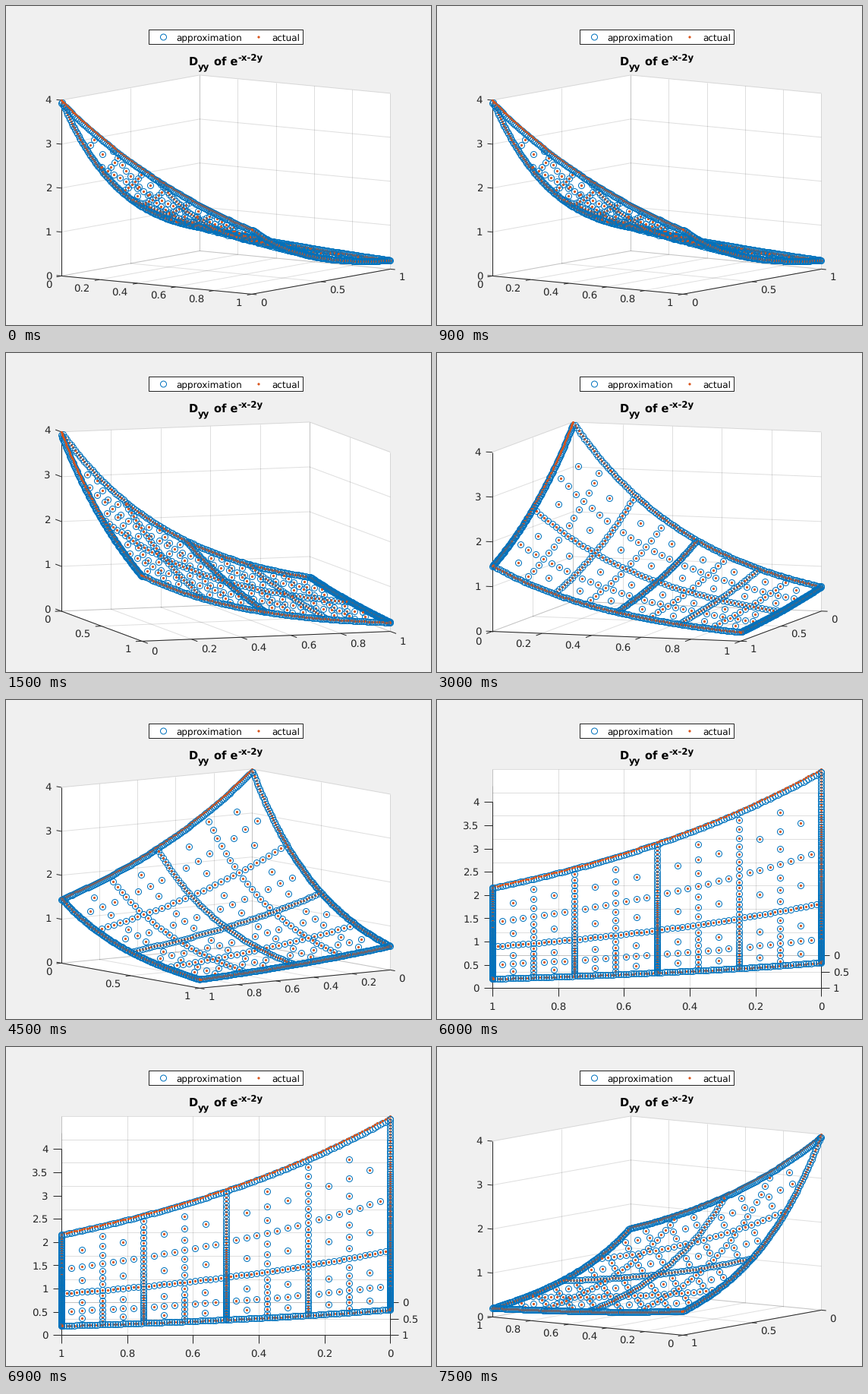
Write a matplotlib script that moves like this. It is 560 by 420 pixels and loops after 8 s.

```python
import numpy as np
import matplotlib.pyplot as plt
from matplotlib.animation import FuncAnimation
from matplotlib.collections import PathCollection
from matplotlib.patches import Polygon, Rectangle
from matplotlib.path import Path
from matplotlib.transforms import IdentityTransform

W, H, DPI = 560, 420, 100
PT = 72 / DPI                        # points per pixel
LEFT, RIGHT, TOP, BOTTOM = 72.8, 506.4, 91.0, 379.4
ELEV = np.radians(10)
LEVEL = 7
BLUE, ORANGE, INK = "#0072bd", "#d95319", "#262626"
RING, DOT = Path.circle((0, 0), 4), Path.circle((0, 0), 1.6)

plt.rcParams["font.family"] = "DejaVu Sans"
plt.rcParams["text.hinting"] = "none"
fig = plt.figure(figsize=(W / DPI, H / DPI), dpi=DPI, facecolor="#f0f0f0")
ax = fig.add_axes([0, 0, 1, 1])


def nodes(level):
    if level == 0:
        return [0.0, 1.0]
    return [k / 2**level for k in range(1, 2**level, 2)]


def sparse_grid(n):
    return np.array([(x, y) for a in range(n + 1) for b in range(n + 1 - a)
                     for x in nodes(a) for y in nodes(b)])


def surface(x, y):
    return 4 * np.exp(-x - 2 * y)


GX, GY = sparse_grid(LEVEL).T
STEP = 1 / 2**LEVEL
# the difference quotient is one-sided at the borders
APPROX = surface(GX, np.clip(GY, STEP, 1 - STEP))
ACTUAL = surface(GX, GY)


class View:
    """Orthographic view of the unit box, stretched to the plot area."""

    def __init__(self, azimuth):
        a = np.radians(azimuth + 1e-7)
        self.c, self.s = np.cos(a), np.sin(a)
        box = np.array([(x, y, z) for x in (0, 1) for y in (0, 1) for z in (0, 4)])
        u, v, _ = self.turn(*box.T)
        self.u0, self.v0 = u.min(), v.min()
        self.ku = (RIGHT - LEFT) / np.ptp(u)
        self.kv = (BOTTOM - TOP) / np.ptp(v)

    def turn(self, x, y, z):
        u = x * self.c + y * self.s
        d = y * self.c - x * self.s
        z = z / 4
        return (u, z * np.cos(ELEV) + d * np.sin(ELEV),
                d * np.cos(ELEV) - z * np.sin(ELEV))

    def depth(self, x, y, z):
        return np.round(self.turn(x, y, z)[2], 6)

    def px(self, x, y, z=0):
        u, v, _ = self.turn(x, y, z)
        return np.array([LEFT + (u - self.u0) * self.ku,
                         BOTTOM - (v - self.v0) * self.kv])


def label(x, y, text, size=13.33, ha="center", **kw):
    """Text whose digits are centred on y."""
    ax.text(x, y + 0.365 * size, text, fontsize=size * PT, ha=ha,
            va="baseline", **{"color": INK, **kw})


def lines(segments, color, alpha=1.0):
    for (x0, y0), (x1, y1) in segments:
        ax.plot([x0, x1], [y0, y1], color=color, alpha=alpha, lw=PT,
                solid_capstyle="butt")


def markers(points, rings, zorder):
    ax.add_collection(PathCollection(
        [RING if r else DOT for r in rings], offsets=points,
        offset_transform=ax.transData, transform=IdentityTransform(),
        facecolors=["none" if r else ORANGE for r in rings],
        edgecolors=[BLUE if r else "none" for r in rings],
        linewidths=[PT if r else 0 for r in rings],
        clip_on=False, zorder=zorder), autolim=False)


def ticks(step, end=1):
    return np.arange(round(end / step) + 1) * step


def unit(vec):
    return vec / np.hypot(*vec)


def draw_box(view):
    corners = [np.array(c, float) for c in ((0, 0), (1, 0), (0, 1), (1, 1))]
    left, *_, right = sorted(corners, key=lambda c: view.px(*c)[0])
    by_depth = sorted(corners, key=lambda c: view.turn(*c, 0)[2])
    front, back = by_depth[0], by_depth[-1]
    up = view.px(0, 0, 0)[1] - view.px(0, 0, 4)[1]
    zticks = ticks(0.5 if up > 240 else 1, 4)

    def edge_ticks(a, b):
        wide = np.hypot(*(view.px(*b) - view.px(*a))) > 200
        return ticks(0.2 if wide else 0.5)

    hull = [view.px(*left, 4), view.px(*back, 4), view.px(*right, 4),
            view.px(*right), view.px(*front), view.px(*left)]
    ax.add_patch(Polygon(hull, facecolor="white", edgecolor="none"))

    # grid on the floor and on the two walls behind
    grid = []
    for a, b, shift in ((left, front, back - left), (front, right, back - right)):
        for t in edge_ticks(a, b):
            p = a + t * (b - a)
            grid.append((view.px(*p), view.px(*(p + shift))))
            grid.append((view.px(*(p + shift)), view.px(*(p + shift), 4)))
    for a in (left, right):
        if abs(view.px(*a)[0] - view.px(*back)[0]) > 1:
            grid += [(view.px(*a, z), view.px(*back, z)) for z in zticks]
    lines(grid, INK, 0.15)

    # rulers
    axes = [(view.px(*left), view.px(*left, 4)),
            (view.px(*left), view.px(*front)), (view.px(*front), view.px(*right))]
    size = 0.025 * max(np.hypot(*(q - p)) for p, q in axes)
    marks = []

    out = size * unit(view.px(*left) - view.px(*front))
    for z in zticks:
        p = view.px(*left, z)
        marks.append((p, p + out))
        label(p[0] + out[0] - 6.3, p[1] + out[1], f"{z:g}", ha="right")

    for a, b, other in ((left, front, right), (right, front, left)):
        out = size * unit(view.px(*front) - view.px(*other))
        along = 0 if a[0] != b[0] else 1
        for t in edge_ticks(a, b):
            p3 = a + t * (b - a)
            p = view.px(*p3)
            q = p + out
            marks.append((p, q))
            text = f"{abs(round(p3[along], 2)):g}"
            if abs(out[0]) < 0.01:
                label(q[0], q[1] + 13, text)
            else:
                side = np.sign(out[0])
                drop = 0 if abs(out[1]) < 0.01 else 9.5
                label(q[0] + 5.5 * side - 0.8, q[1] + drop, text,
                      ha="left" if side > 0 else "right")
    lines(axes + marks, INK)


def draw_points(view):
    x, y = np.tile(GX, 2), np.tile(GY, 2)
    z = np.concatenate([APPROX, ACTUAL])
    rings = np.arange(len(z)) < len(GX)
    order = np.argsort(-view.depth(x, y, z), kind="stable")
    pts = np.floor(view.px(x, y, z).T + 0.5) + 0.5
    markers(pts[order], rings[order], zorder=5)


def draw_heading():
    bold = dict(color="black", fontweight="bold", va="baseline", ha="left")
    big, small = 14.67 * PT, 11.73 * PT
    for x, y, text, size in ((240.9, 78, "D", big), (253.1, 84, "yy", small),
                             (273.5, 78, "of e", big), (305.2, 72, "-x-2y", small)):
        ax.text(x, y, text, fontsize=size, **bold)

    ax.add_patch(Rectangle((188, 31), 203, 19, facecolor="white",
                           edgecolor=INK, lw=PT, zorder=7))
    markers(np.array([(207.5, 41), (333, 41)]), [True, False], zorder=8)
    for x, text in ((224.5, "approximation"), (350.5, "actual")):
        label(x, 41, text, size=12, ha="left", color="black", zorder=8)


def update(i):
    ax.clear()
    ax.set_xlim(0, W)
    ax.set_ylim(H, 0)
    ax.axis("off")
    view = View(36 * (i // 3 + 1))   # the view jumps every 1.5 s
    draw_box(view)
    draw_points(view)
    draw_heading()
    return []


anim = FuncAnimation(fig, update, frames=16, interval=500,
                     init_func=lambda: [], repeat=True, repeat_delay=0)
plt.show()
```
